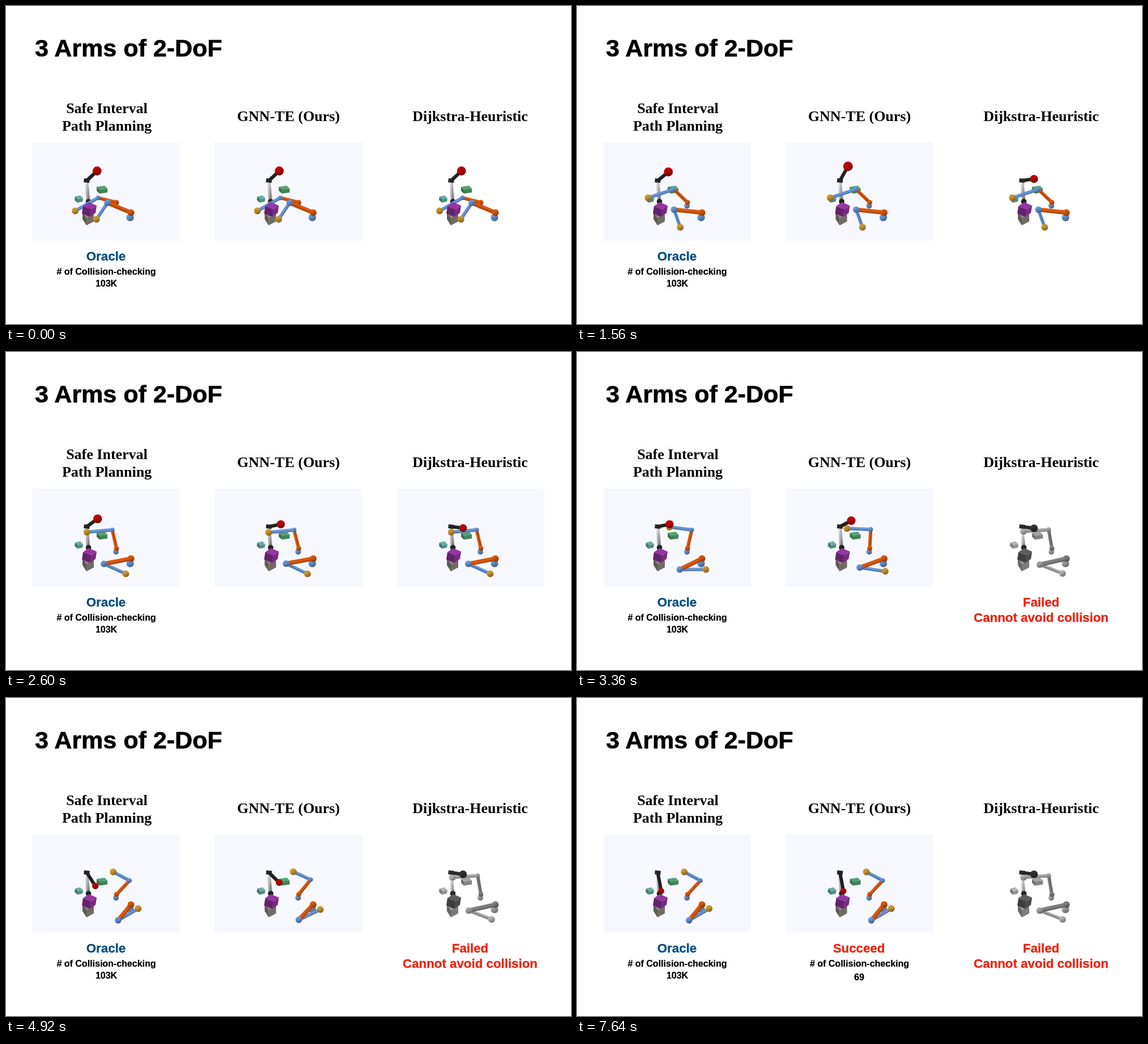
Write an HTML page with a canvas that moves like this. It is 997 by 561 pixels and loops after 8120 ms.

```html
<!DOCTYPE html>
<html lang="en">
<head>
<meta charset="utf-8">
<title>3 Arms of 2-DoF</title>
<style>
  html, body { margin: 0; width: 100%; height: 100%; overflow: hidden; background: #fff; }
  svg, canvas { position: absolute; left: 0; top: 0; width: 997px; height: 561px; }
  text { font: bold 16px "Liberation Sans", Arial, sans-serif; text-anchor: middle;
         fill: currentColor; stroke: currentColor; stroke-width: .015em; }
  .title { font-size: 43px; text-anchor: start; }
  .head { font: bold 26px "Liberation Serif", Times, serif; stroke: none; }
  .big { font-size: 22.3px; }
  .red { color: #ee220c; }
  .blue { color: #004d80; }
  rect { fill: #f7f8fe; }
</style>
</head>
<body>
<svg viewBox="0 0 997 561">
  <rect x="47" y="241" width="260" height="173"/>
  <rect x="368" y="241" width="261" height="173"/>
  <rect id="third" x="690" y="241" width="260" height="173"/>
  <text class="title" x="51" y="89">3 Arms of 2-DoF</text>
  <text class="head" x="178" y="189">Safe Interval</text>
  <text class="head" x="178" y="220">Path Planning</text>
  <text class="head" x="498.5" y="203">GNN-TE (Ours)</text>
  <text class="head" x="819" y="203">Dijkstra-Heuristic</text>
  <text class="big blue" x="176.5" y="449">Oracle</text>
  <text x="177" y="473.5">#&#32;of Collision-checking</text>
  <text x="177" y="495">103K</text>
  <g id="success">
    <text class="big red" x="497.5" y="449">Succeed</text>
    <text x="498.5" y="473.5">#&#32;of Collision-checking</text>
    <text x="498" y="498">69</text>
  </g>
  <g id="failure">
    <text class="big red" x="819" y="449">Failed</text>
    <text class="big red" x="819" y="476">Cannot avoid collision</text>
  </g>
</svg>
<canvas id="stage" width="997" height="561"></canvas>
<script>
const ctx = stage.getContext('2d');
const LOOP = 8120, FAIL_STEP = 26, ARM_STEPS = 40;
const BLUE = '#6694d6', ORANGE = '#d9570c', YELLOW = '#cb982f', BLACK = '#242424', RED = '#bc0404';

// A link's tip turns on an ellipse around its pivot; angles in degrees
const upper = {
  base: [195, 346.5], foot: [194, 352.5], size: 5,
  links: [{ rx: 33.5, ry: 33.5, from: -166, to: -47 },
          { rx: 48, ry: 27, lean: 160, from: -17, to: 63 }]
};
const lower = {
  base: [220.5, 364.5], foot: [219, 373], size: 6.6,
  links: [{ rx: 50, ry: 31, from: 214, to: 117 },
          { rx: 46, ry: 32, from: 115, to: -40 }]
};

// turns: [step, angle] of the black arm; pace: speed of the others after step 22
const panels = [
  { x: 0, pace: 1, turns: [[0, -30], [23, -24], [31, -7], [47, 44], [66, 73]] },
  { x: 321.5, pace: .67, turns: [[0, -30], [10, -55], [23, -7], [31, -18], [47, 31], [74, 73]] },
  { x: 643, pace: 1, stop: 24, turns: [[0, -30], [12, -5], [24, 5]] }
];

function ramp(keys, n) {
  const i = keys.findIndex(key => key[0] > n);
  if (i < 0) return keys.at(-1)[1];
  const [n0, v0] = keys[i - 1], [n1, v1] = keys[i];
  return v0 + (v1 - v0) * (n - n0) / (n1 - n0);
}

function orbit([x, y], { rx, ry, lean = 0 }, degrees) {
  const a = degrees * Math.PI / 180, tilt = lean * Math.PI / 180;
  const u = rx * Math.cos(a), v = ry * Math.sin(a);
  return [x + u * Math.cos(tilt) - v * Math.sin(tilt), y + u * Math.sin(tilt) + v * Math.cos(tilt)];
}

function line(a, b, width, color) {
  ctx.lineWidth = width;
  ctx.strokeStyle = color;
  ctx.beginPath();
  ctx.moveTo(...a);
  ctx.lineTo(...b);
  ctx.stroke();
}

function link(a, b, width, color) {
  line(a, b, width, color);
  const shift = ([x, y]) => [x + width * .18, y + width * .3];
  line(shift(a), shift(b), width * .35, '#0003');
}

function ball([x, y], r, color) {
  const shade = ctx.createLinearGradient(x - r / 2, y - r, x + r / 2, y + r);
  shade.addColorStop(.3, '#0000');
  shade.addColorStop(1, '#0006');
  for (const fill of [color, shade]) {
    ctx.fillStyle = fill;
    ctx.beginPath();
    ctx.arc(x, y, r, 0, 7);
    ctx.fill();
  }
}

// Box seen from its nearest corner, with three edges leaving it
function box(color, [x, y], right, back, down) {
  const face = (p, q, shade) => {
    ctx.beginPath();
    ctx.moveTo(x, y);
    ctx.lineTo(x + p[0], y + p[1]);
    ctx.lineTo(x + p[0] + q[0], y + p[1] + q[1]);
    ctx.lineTo(x + q[0], y + q[1]);
    for (const fill of [color, shade]) {
      ctx.fillStyle = fill;
      ctx.fill();
    }
  };
  face(right, back, '#0000');
  face(right, down, '#0003');
  face(back, down, '#0005');
}

function drawArm({ base, foot, size, links: [first, second] }, u) {
  const angle = ({ from, to }) => from + (to - from) * u;
  const elbow = orbit(base, first, angle(first));
  const hand = orbit(elbow, second, angle(second));
  ball(foot, size, BLUE);
  link(elbow, hand, 6, BLUE);
  link(base, elbow, size + 1, ORANGE);
  ball(elbow, size - .8, BLUE);
  ball(hand, 6, YELLOW);
  ball(base, size - .6, ORANGE);
}

function drawPanel({ x, pace, stop = Infinity, turns }, step) {
  const n = Math.min(step, stop);
  const moved = Math.min(n, 22) + Math.max(0, n - 22) * pace;
  const u = Math.min(1, moved / ARM_STEPS) ** 1.15;
  const top = [142.5, 308], [tx, ty] = top;
  const tip = orbit(top, { rx: 21, ry: 34 }, ramp(turns, n));

  ctx.save();
  ctx.translate(x, 0);
  if (step >= FAIL_STEP && stop < step) ctx.filter = 'grayscale(1) brightness(1.15)';

  box('#66aea3', [127, 341], [9, -2], [-5, -5], [-1, 6]);
  box('#52a36f', [165, 324], [14, -2], [-5, -5], [0, 7]);

  const column = ctx.createLinearGradient(0, 312, 0, 342);
  column.addColorStop(0, '#e4e4e4');
  column.addColorStop(1, '#929292');
  link(top, [145, 341], 6.5, column);
  ball([145.5, 345], 4.8, BLACK);
  drawArm(upper, u);
  link(top, tip, 6, BLACK);
  line([tx - 5, ty - .5], [tx + 5, ty + .5], 7, BLACK);
  ball(tip, 8 - (tip[1] - 289) * .055, RED);

  box('#8c877e', [142, 374], [13, -7], [-7, -11], [0, 13]);
  box('#9634a4', [150, 359], [10, -7], [-14, -6], [-2, 13]);
  drawArm(lower, u);
  ctx.restore();
}

function show(node, on) {
  node.style.visibility = on ? 'visible' : 'hidden';
}

function draw(now) {
  const t = now % LOOP;
  // Poses advance every 96 ms, on a 40 ms clock
  const step = Math.max(0, Math.floor((Math.floor(t / 40) * 40 - 480) / 96) + 1);
  ctx.clearRect(0, 0, 997, 561);
  for (const panel of panels) drawPanel(panel, step);
  show(third, step >= 18 && step < FAIL_STEP);
  show(failure, step >= FAIL_STEP);
  show(success, t >= 7640);
  requestAnimationFrame(draw);
}
requestAnimationFrame(draw);
</script>
</body>
</html>
```
